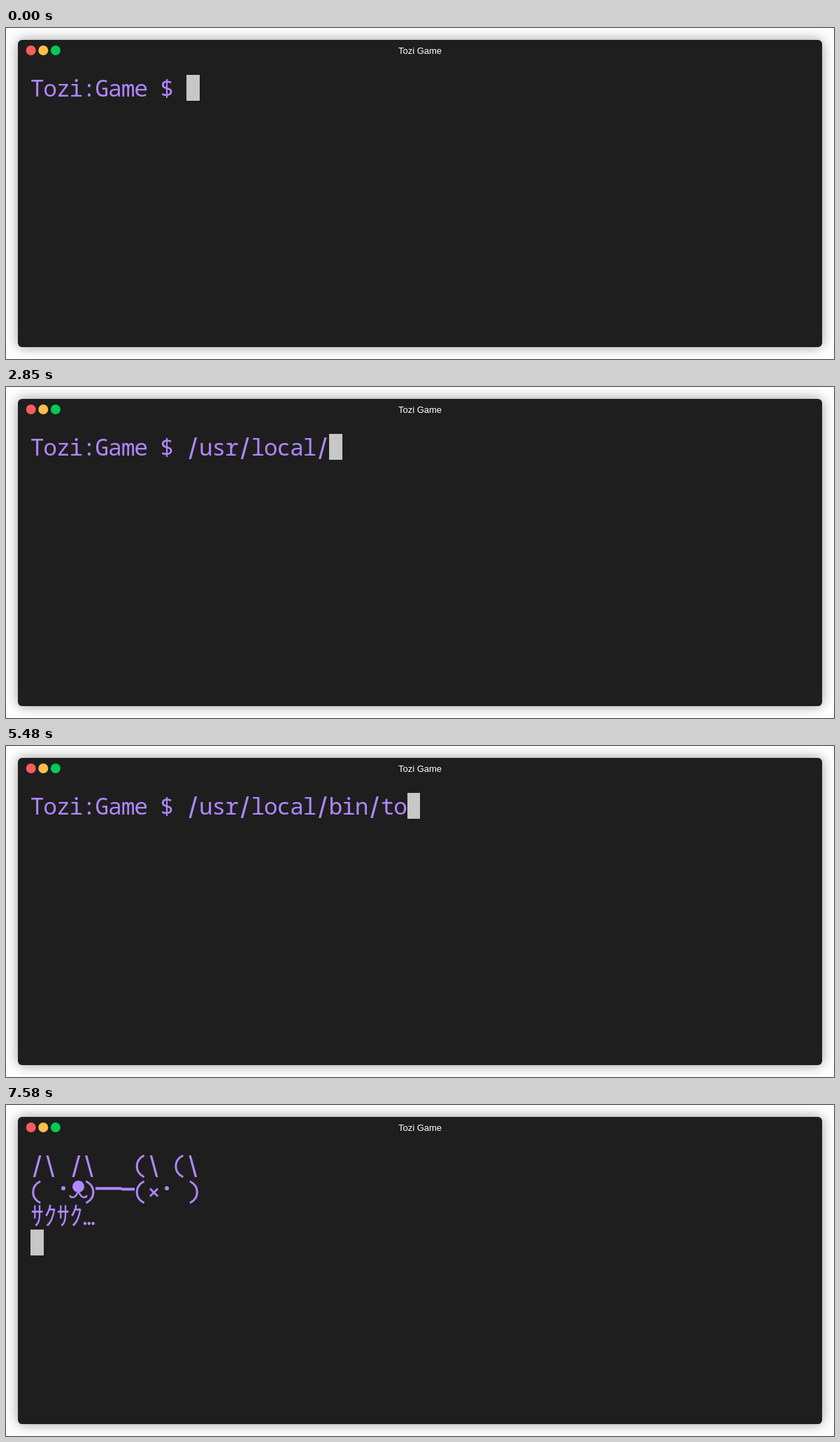
An HTML page with a canvas for the animation above (8000 ms loop, 1184 by 473 pixels).

```html
<!DOCTYPE html>
<html lang="en">
<head>
<meta charset="utf-8">
<title>Tozi Game</title>
<style>
  html, body { margin: 0; width: 100%; height: 100%; overflow: hidden; background: #fff; }
  .window {
    position: absolute; left: 17px; top: 17px; width: 1150px; height: 439px;
    border-radius: 6px; background: #1e1e1e; box-shadow: 0 0 18px rgba(0, 0, 0, .4);
  }
  canvas { position: absolute; left: 0; top: 0; }
</style>
</head>
<body>
<div class="window"></div>
<canvas id="stage" width="1184" height="473"></canvas>
<script>
const ctx = document.getElementById('stage').getContext('2d');
const LOOP = 8000;
const LEFT = 35.4, TOP = 67, CELL = 18.556, ROW = 37;
const INK = '#af87ff', CURSOR = '#c7c7c7';
const MONO = '33px "Noto Sans Mono", "DejaVu Sans Mono", monospace';
const SLASH = '42px "Liberation Sans", Arial, sans-serif';
const KANA = '37px "Noto Sans CJK JP", "Noto Sans CJK", sans-serif';
const PROMPT = 'Tozi:Game $ ';
const COMMAND = '/usr/local/bin/tozi-game ';

// [time, characters typed]
const KEYS = [
  [0, 0], [1330, 1], [1700, 4], [1840, 5], [2600, 6], [2770, 8], [2850, 11],
  [3630, 12], [3680, 13], [3840, 15], [4580, 16], [5480, 17], [5620, 20], [5960, 25]
];
const RUN = 6580, CRUNCH = 7580;

const cellX = col => LEFT + col * CELL;
const rowY = row => TOP + row * ROW;

function dot(x, y, r, color = INK) {
  ctx.fillStyle = color;
  ctx.beginPath();
  ctx.arc(x, y, r, 0, Math.PI * 2);
  ctx.fill();
}

function stroke(path, width) {
  ctx.strokeStyle = INK;
  ctx.lineWidth = width;
  ctx.stroke(new Path2D(path));
}

function glyph(ch, col, row) {
  const slash = ch === '/' || ch === '\\';
  const kana = ch > '\uff60';
  ctx.font = slash ? SLASH : kana ? KANA : MONO;
  ctx.fillStyle = INK;
  ctx.textAlign = 'center';
  ctx.fillText(ch, cellX(col + 0.5), rowY(row) + (slash ? 36 : 30.7));
}

function write(text, row, col = 0) {
  [...text].forEach((ch, i) => {
    if (ch !== ' ') glyph(ch, col + i, row);
  });
}

function paren(col, row, dir) {
  const x = cellX(col + 0.5), y = rowY(row) + 5;
  const outer = x - 9.5 * dir, tip = x + 4.5 * dir;
  stroke(`M${tip} ${y} C${outer} ${y + 7} ${outer} ${y + 24} ${tip} ${y + 31}`, 3);
}

function cursor(col, row) {
  const x = Math.round(cellX(col));
  ctx.fillStyle = CURSOR;
  ctx.fillRect(x, rowY(row), Math.round(cellX(col + 1)) - x, ROW);
}

function titleBar() {
  ['#ff5c5c', '#ffbd4c', '#00ca56'].forEach((color, i) => dot(35.7 + i * 17.6, 32, 7, color));
  ctx.font = '13px "Liberation Sans", Arial, sans-serif';
  ctx.fillStyle = '#fff';
  ctx.textAlign = 'center';
  ctx.fillText('Tozi Game', 592, 37);
}

function animals() {
  write('/\\ /\\', 0);
  write('\\', 0, 9);
  write('\\', 0, 12);
  paren(8, 0, 1);
  paren(11, 0, 1);
  paren(0, 1, 1);
  paren(4, 1, -1);
  paren(8, 1, 1);
  paren(12, 1, -1);
  dot(82, 119, 3);
  dot(230, 119, 3);
  // snout
  dot(103.5, 116.5, 8.5);
  stroke('M103.5 123 Q100 132 95 132 Q92 132 91.5 129 M103.5 123 Q107 132 112 132 Q115 132 115.5 129', 2.5);
  // shared stick
  ctx.fillStyle = INK;
  ctx.fillRect(128, 117.3, 37.5, 4);
  ctx.fillRect(165, 118.3, 19, 4);
  stroke('M206 119.5 l11 11 m0 -11 l-11 11', 2.8);
}

function crunch() {
  write('ｻｸｻｸ', 2);
  for (let i = 0; i < 3; i++) dot(113 + i * 5.8, 169.3, 2.2);
}

function draw(t) {
  ctx.clearRect(0, 0, 1184, 473);
  titleBar();
  if (t < RUN) {
    const typed = KEYS.filter(k => k[0] <= t).pop()[1];
    const line = PROMPT + COMMAND.slice(0, typed);
    write(line, 0);
    cursor(line.length, 0);
    return;
  }
  animals();
  if (t >= CRUNCH) crunch();
  cursor(0, t >= CRUNCH ? 3 : 2);
}

const start = performance.now();
function tick() {
  draw((performance.now() - start) % LOOP);
  requestAnimationFrame(tick);
}
tick();
</script>
</body>
</html>
```
